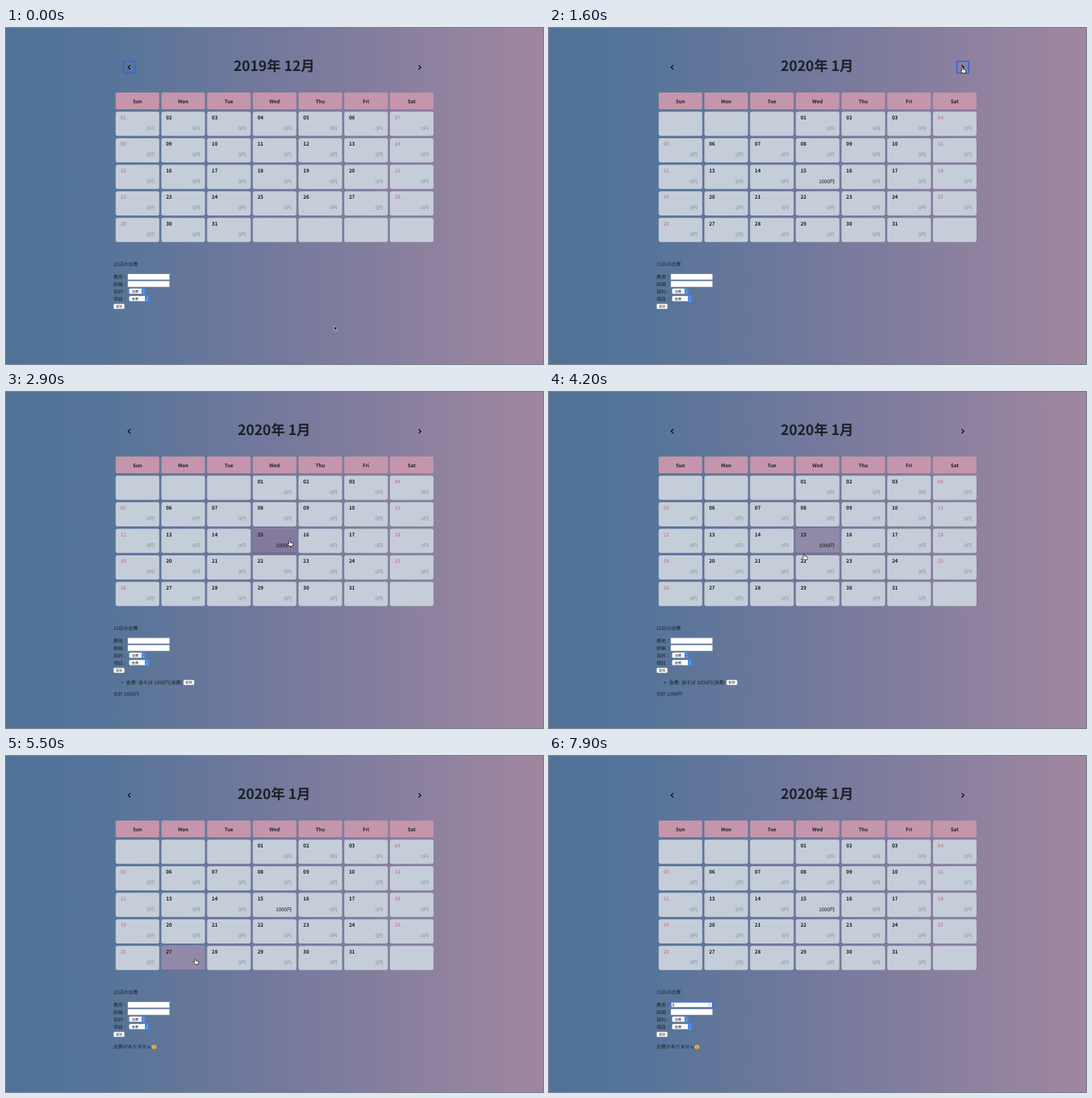
An HTML page for the animation above (8000 ms loop, 800 px wide and 500 px high).

```html
<!DOCTYPE html>
<html lang="ja">
<head>
<meta charset="utf-8">
<style>
html, body { margin: 0; width: 100%; height: 100%; overflow: hidden; }
body { background: linear-gradient(90deg, #507297, #557499 18%, #74799c 50%, #857e9e 70%, #9684a0 88%, #a0869f); }
svg { display: block; width: 800px; height: 500px; font: 7.1px "Noto Sans CJK JP", "Noto Sans CJK", sans-serif; text-rendering: geometricPrecision; }
</style>
</head>
<body>
<svg id="stage" viewBox="0 0 800 500"></svg>
<script>
const LOOP = 8000;
const NEXT_CLICK = 1100, DAY15_CLICK = 2800, DAY21_CLICK = 5100, INPUT_CLICK = 6900, TYPED = 7700;
const INK = '#1e2027', BLUE = '#2868dc';
const CELL = { w: 64.9, h: 36 };

// Pointer stops: time, x, y
const stops = [
  [0, 489, 443], [200, 489, 443], [600, 606, 42], [850, 616, 58.5], [1900, 616, 58.5],
  [2600, 422.5, 221], [3900, 422.5, 221], [4500, 338, 261], [5150, 338, 261],
  [5500, 282, 301.5], [6000, 222, 369], [8000, 222, 369]
];

function pointer(t) {
  t = Math.max(0, t);
  const i = Math.max(1, stops.findIndex(s => s[0] >= t));
  const [t0, x0, y0] = stops[i - 1], [t1, x1, y1] = stops[i];
  const p = (t - t0) / (t1 - t0), e = p * p * (3 - 2 * p);
  return { x: x0 + (x1 - x0) * e, y: y0 + (y1 - y0) * e };
}

const inside = (p, x, y, w, h) => p.x >= x && p.x <= x + w && p.y >= y && p.y <= y + h;
const rect = (x, y, w, h, fill, attrs = '') =>
  `<rect x="${x}" y="${y}" width="${w}" height="${h}" fill="${fill}" ${attrs}/>`;
const text = (x, y, str, attrs = '') => `<text x="${x}" y="${y}" fill="${INK}" ${attrs}>${str}</text>`;
const line = (d, color, width) =>
  `<path d="${d}" fill="none" stroke="${color}" stroke-width="${width}"/>`;
const colX = col => 163.4 + 68.1 * col;
const rowY = row => 124.4 + 39.5 * row;

function header(t) {
  const january = t >= NEXT_CLICK;
  const ringX = !january ? 174.7 : t < DAY15_CLICK ? 607.7 : 0;
  return text(399.5, 64.3, january ? '2020年 1月' : '2019年 12月', 'font-size="21" font-weight="700" text-anchor="middle"') +
    line('M185.3 55.2L182 58.5L185.3 61.8M614.7 55.2L618 58.5L614.7 61.8', '#111', 1.6) +
    (ringX ? rect(ringX, 49.6, 17.6, 17.6, 'none', `stroke="${BLUE}" stroke-width="1.8"`) : '') +
    ['Sun', 'Mon', 'Tue', 'Wed', 'Thu', 'Fri', 'Sat'].map((name, col) =>
      rect(colX(col), 96, CELL.w, 25, '#c495ab', 'rx="2"') +
      text(colX(col) + CELL.w / 2, 112.4, name, 'font-size="7.3" font-weight="700" text-anchor="middle"')).join('');
}

function dayCell(i, t) {
  const january = t >= NEXT_CLICK, col = i % 7;
  const day = i + 1 - (january ? 3 : 0);
  const x = colX(col), y = rowY(Math.floor(i / 7));
  let out = rect(x, y, CELL.w, CELL.h, '#c5cdd9', 'rx="3"');
  if (day < 1 || day > 31) return out;

  // Hover fades over the last 120 ms of pointer positions
  const lags = [0, 30, 60, 90, 120];
  const hover = lags.filter(lag => inside(pointer(t - lag), x, y, CELL.w, CELL.h)).length / lags.length;
  if (hover) {
    out += `<g opacity="${hover}">` + rect(x, y + 0.9, CELL.w, CELL.h, '#555670', 'rx="3"') +
      rect(x, y, CELL.w, CELL.h, '#83799b', 'rx="3"') + '</g>';
  }
  const weekend = col === 0 || col === 6, spent = january && day === 15;
  return out +
    text(x + 7, y + 11.3, String(day).padStart(2, '0'),
      `font-size="7.4" font-weight="700" style="fill:${weekend ? '#c683a0' : '#15171c'}"`) +
    text(x + 57.7, y + 27.1, (spent ? 1000 : 0) + '円',
      `font-size="7.3" text-anchor="end" style="fill:${spent ? '#15171c' : '#858d9b'}"`);
}

const button = (x, y, label) =>
  rect(x, y, 16, 7.4, '#fff', 'rx="1.6" stroke="#a9adb8" stroke-width=".4"') +
  text(x + 8, y + 5.5, label, 'font-size="5" text-anchor="middle"');

const select = (y, width, label) =>
  rect(183.5, y, width, 7.6, '#fff', 'rx="1.5"') +
  rect(183.5 + width - 6.2, y, 6.2, 7.6, '#2b7bee', 'rx="1.5"') +
  line(`M${181.8 + width - 2.8} ${y + 3}l1.4 -1.5l1.4 1.5m0 1.7l-1.4 1.5l-1.4 -1.5`, '#fff', 0.7) +
  text(187.3, y + 5.7, label, 'font-size="5" font-weight="500"');

function form(t) {
  const shows15 = t >= DAY15_CLICK && t < DAY21_CLICK, focused = t >= INPUT_CLICK;
  const box = y => rect(181.6, y, 62, 8.5, '#fff', 'stroke="#adb2be" stroke-width=".6"');
  let out = text(160, 354.3, (shows15 ? 15 : 21) + '日の出費') +
    ['費用', '詳細', '目的', '項目'].map((label, i) => text(160, 372.8 + 10.9 * i, label + '：')).join('') +
    box(366) + box(376.7) + select(387.8, 24.6, '消費') + select(398.8, 29.6, '食費') +
    button(160.4, 410.5, '追加');

  if (focused) out += rect(181.8, 366.2, 61.6, 8.1, 'none', `stroke="${BLUE}" stroke-width="1.2"`);
  if (focused || inside(pointer(t), 181, 366, 63, 9)) {
    out += line('M238 369.2l1.2 -1.3l1.2 1.3m0 2l-1.2 1.3l-1.2 -1.3', '#555', 0.7);
  }
  if (t >= TYPED) out += text(182.9, 372.2, '1', 'font-size="5.2"');
  if (focused) out += line(`M${t >= TYPED ? 185.8 : 183.3} 367.5v5.6`, '#222', 0.6);

  if (shows15) {
    out += `<circle cx="172.8" cy="432.3" r="1.1" fill="${INK}"/>` +
      text(179, 434.6, '食費: 油そば 1000円(浪費)', 'font-size="7.2"') +
      button(264.4, 428.6, '削除') + text(160, 452.4, '合計 1000円');
  } else if (t >= DAY21_CLICK) {
    out += text(160, 435.2, '出費がありません') +
      '<circle cx="220.6" cy="432.7" r="3.5" fill="#efb94a"/>' +
      line('M217.8 430.2q2.8 -2.2 5.6 0', '#8d6238', 1) +
      line('M219.2 431.7v1.1m2.8 -1.1v1.1m-2.5 2h2.2', '#51402f', 0.8);
  }
  return out;
}

function cursor(t) {
  if (t >= TYPED) return '';
  const p = pointer(t);
  const overInput = inside(p, 181, 366, 63, 9);
  const overLink = inside(p, 163, 124, 474, 195) || inside(p, 607, 49, 19, 19);
  const shape = overInput
    ? line('M-1.5 -3.6Q0 -3.6 0 -2.6V2.6Q0 3.6 -1.5 3.6M1.5 -3.6Q0 -3.6 0 -2.6M0 2.6Q0 3.6 1.5 3.6', '#222', 0.8)
    : overLink
      ? '<path d="M-1 .8Q0 -.6 1 .8V3.2L4.2 3.9Q5.2 4.2 5 5.5L4.2 8.6H0L-2.8 5.3Q-2.8 4 -1 5Z" fill="#fff" stroke="#111" stroke-width=".8"/>'
      : '<path d="M0 0V7L1.6 5.5L2.7 8.1L3.9 7.5L2.8 5.1H5Z" fill="#111" stroke="#fff" stroke-width=".6"/>';
  return `<g transform="translate(${p.x} ${p.y})">${shape}</g>`;
}

const stage = document.getElementById('stage');
const start = performance.now();

function draw() {
  const t = (performance.now() - start) % LOOP;
  stage.innerHTML = header(t) + Array.from({ length: 35 }, (_, i) => dayCell(i, t)).join('') + form(t) + cursor(t);
  requestAnimationFrame(draw);
}
draw();
</script>
</body>
</html>
```
